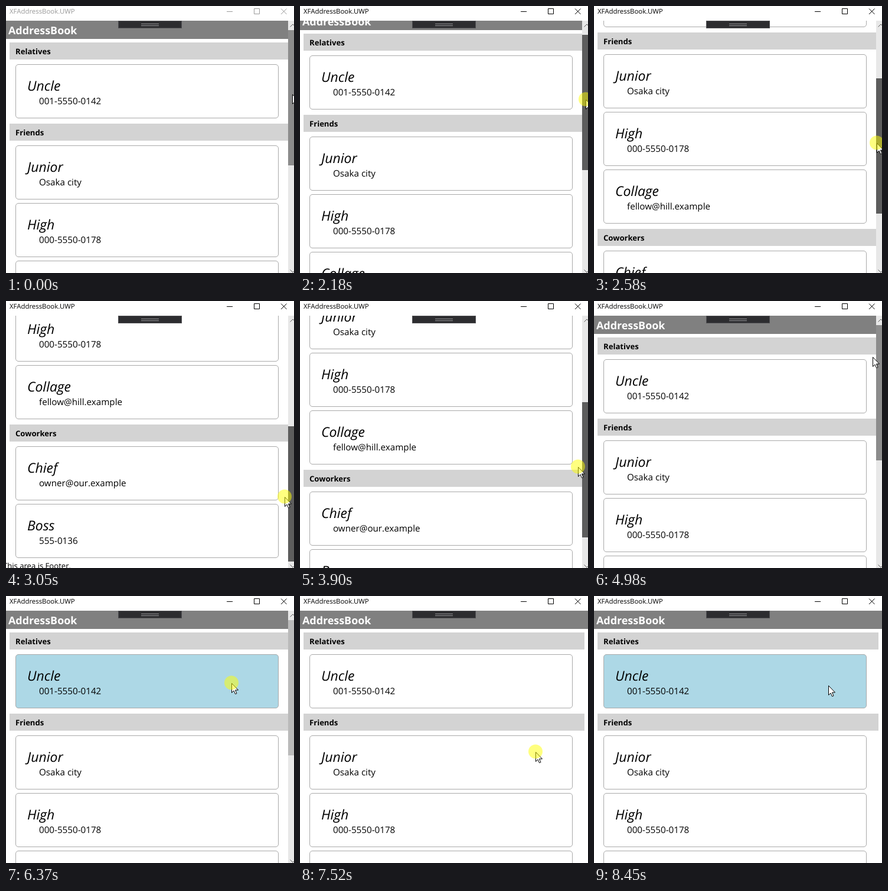
These frames come from a looping animation (488x454 px, 9.08 s). An HTML page:

```html
<!DOCTYPE html>
<html lang="en">
<head>
<meta charset="utf-8">
<title>Address book</title>
<style>
html, body { margin: 0; width: 100%; height: 100%; overflow: hidden; background: #fff; }
svg { display: block; width: 488px; height: 454px; font-family: "Open Sans", "Noto Sans", sans-serif; text-rendering: geometricPrecision; }
text { white-space: pre; }
.name { font-size: 23px; font-style: italic; }
.info { font-size: 15.2px; }
.group { font-size: 13.1px; font-weight: 700; }
.title { font-size: 17.9px; font-weight: 700; fill: #fff; }
.foot { font-size: 13.1px; }
.caption { font-size: 11.4px; }
</style>
</head>
<body>
<svg viewBox="0 0 488 454">
  <defs><clipPath id="view"><rect y="25" width="488" height="429"/></clipPath></defs>
  <rect width="488" height="454" fill="#fff"/>
  <g clip-path="url(#view)"><g id="page"></g></g>

  <g id="bar">
    <rect x="478" y="25" width="10" height="429" fill="#e8e8e8"/>
    <rect id="thumb" x="478" y="41" width="10" height="230"/>
    <path d="M481.500 35.500l4.500-4.500 4.500 4.500M481.500 448.500l4.500 4.500 4.500-4.500" fill="none" stroke="#5a5a5a"/>
  </g>

  <rect x="190.500" y="25.500" width="107" height="12" fill="#2d2d30" stroke="#505053"/>
  <path d="M229 30.500h30M229 33.500h30" stroke="#969699"/>

  <g id="chrome">
    <text class="caption" x="6" y="13">XFAddressBook.UWP</text>
    <path id="buttons" d="M374 9.500h10M420.500 4.500h9v9h-9zM466 4.500l9.500 9.500M475.500 4.500l-9.500 9.500" fill="none"/>
  </g>

  <g id="pointer">
    <path d="M.5.5v16l3.500-3.500 2.500 5.700 2.500-1-2.500-5.700h5z" fill="#fff" stroke="#000"/>
    <circle id="halo" r="12" cy="-.5" fill="#ff0" fill-opacity=".5"/>
  </g>
</svg>
<script>
const LOOP = 9080, STEP = 77.8, MAX_SCROLL = 324, MAX_DRAG = 172, GRAB_Y = 151;
const $ = id => document.getElementById(id);
const page = $('page'), thumb = $('thumb');

function add(tag, attrs, text) {
  const el = document.createElementNS('http://www.w3.org/2000/svg', tag);
  for (const k in attrs) el.setAttribute(k, attrs[k]);
  if (text) el.textContent = text;
  return page.appendChild(el);
}

const groups = {
  Relatives: { Uncle: '001-5550-0142' },
  Friends: { Junior: 'Osaka city', High: '000-5550-0178', Collage: 'fellow@hill.example' },
  Coworkers: { Chief: 'owner@our.example', Boss: '555-0136' }
};
const cards = {};

function buildPage() {
  add('rect', { x: 0, y: 25, width: 488, height: 31, fill: '#808080' });
  add('text', { x: 4, y: 48, class: 'title' }, 'AddressBook');
  let y = 62;
  for (const label in groups) {
    add('rect', { x: 6, y, width: 476, height: 29, fill: '#d3d3d3' });
    add('text', { x: 16, y: y + 20, class: 'group' }, label);
    y += 37;
    for (const name in groups[label]) {
      cards[name] = add('rect', { x: 16.5, y: y + .5, width: 445, height: 91, rx: 4.5, stroke: '#a9a9a9' });
      add('text', { x: 36, y: y + 45, class: 'name' }, name);
      add('text', { x: 56, y: y + 68, class: 'info' }, groups[label][name]);
      y += 98;
    }
    y += 3;
  }
  add('text', { x: -5, y: y + 9, class: 'foot' }, 'This area is Footer.');
}

const linear = p => p;
const smooth = p => p * p * p * (10 - 15 * p + 6 * p * p);
const clamp = (v, lo, hi) => Math.min(hi, Math.max(lo, v));

const moves = [
  { from: 1925, to: 3320, x: 471, y: 345, ease: smooth },
  { from: 3525, to: 4980, x: 472, y: 95, ease: linear },
  { from: 5050, to: 5360, x: 382, y: 148, ease: linear },
  { from: 6980, to: 7380, x: 399, y: 265, ease: linear },
  { from: 7680, to: 8060, x: 397, y: 152, ease: linear }
];
const drag = { down: 1630, up: 4980 };
const clicks = [
  { down: 5590, up: 5740, card: 'Uncle' },
  { down: 6370, up: 6450, card: 'Uncle' },
  { down: 7500, up: 7600, card: 'Junior' },
  { down: 8380, up: 8450, card: 'Uncle' }
];

function pointerAt(t) {
  let x = 485, y = 150;
  for (const m of moves) {
    const p = m.ease(clamp((t - m.from) / (m.to - m.from), 0, 1));
    x += (m.x - x) * p;
    y += (m.y - y) * p;
  }
  return [x, y];
}

// Tapping the selected card again clears it.
const selectedAt = t => clicks.filter(c => c.up <= t)
  .reduce((old, c) => old === c.card ? null : c.card, null);

const fill = (el, color) => el.setAttribute('fill', color);
const move = (el, x, y) => el.setAttribute('transform', `translate(${Math.round(x)} ${Math.round(y)})`);
const show = (el, on) => el.setAttribute('visibility', on ? 'visible' : 'hidden');

function draw(t) {
  const tick = Math.floor((t - 1) / STEP) * STEP + 1;
  const [x, y] = pointerAt(tick);
  const offset = t < drag.up ? clamp(y - GRAB_Y, 0, MAX_DRAG) : 0;
  move($('pointer'), x, y);
  move(thumb, 0, offset);
  move(page, 0, -offset * MAX_SCROLL / MAX_DRAG);

  const hover = t < 5130, dragging = t >= 1720 && t < drag.up;
  fill(thumb, dragging ? '#5d5d5d' : hover ? '#8c8c8c' : '#bababa');
  show($('bar'), t < 7130);
  show($('halo'), [drag, ...clicks].some(c => t >= c.down && t < c.up));

  const selected = selectedAt(t);
  for (const name in cards) fill(cards[name], name === selected ? '#add8e6' : '#fff');

  const ink = t < drag.down ? '#999' : '#000';
  fill($('chrome'), ink);
  $('buttons').setAttribute('stroke', ink);
}

buildPage();
const start = performance.now();
function frame() {
  draw((performance.now() - start) % LOOP);
  requestAnimationFrame(frame);
}
frame();
</script>
</body>
</html>
```
